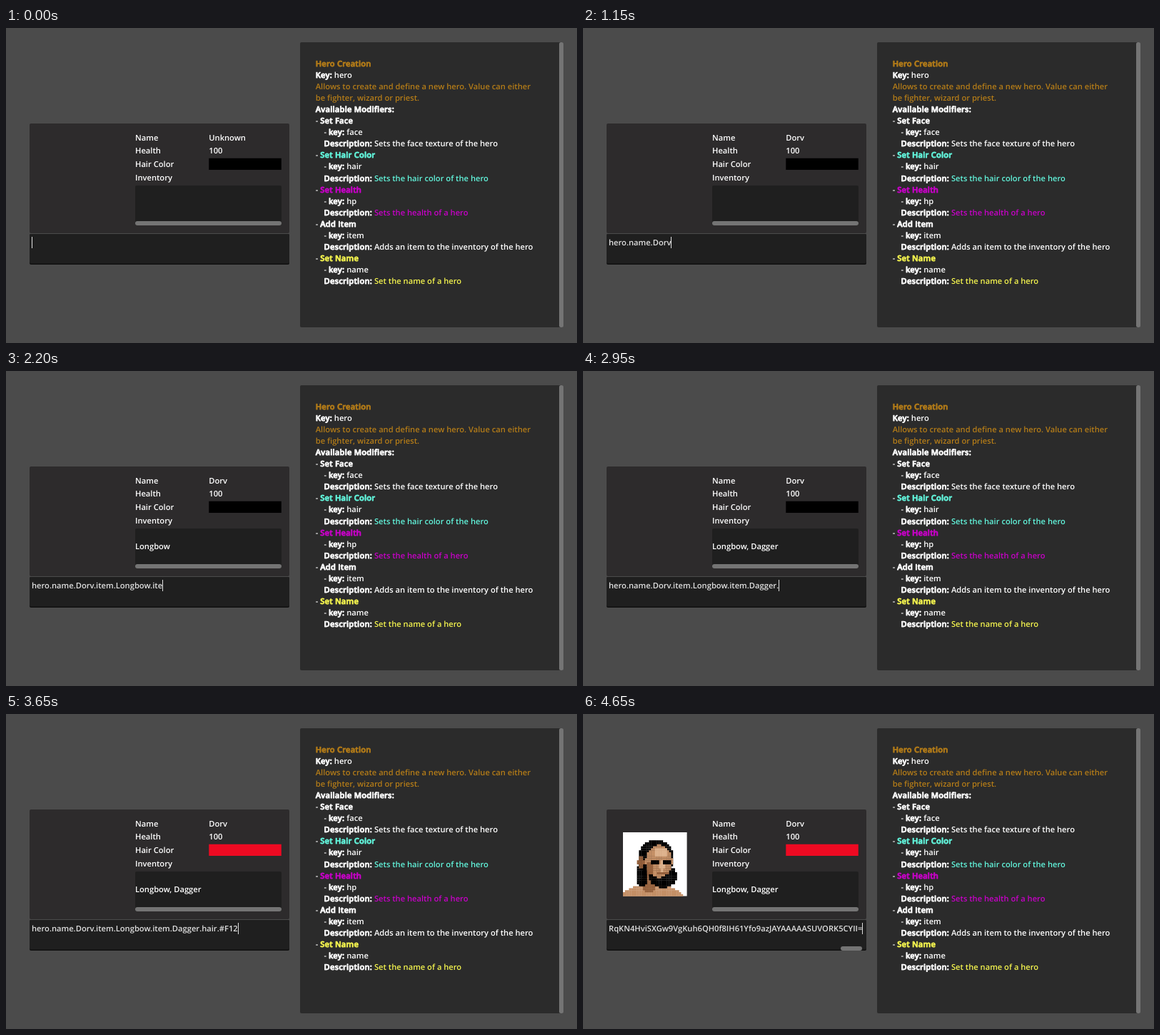
Animation of 800 by 442 pixels, one loop 5150 ms. Source, as an HTML page with a canvas:

```html
<!DOCTYPE html>
<html lang="en">
<head>
<meta charset="utf-8">
<title>Hero Creation</title>
<style>
html, body { margin: 0; width: 100%; height: 100%; overflow: hidden; background: #4b4b4b; }
canvas { display: block; }
</style>
</head>
<body>
<canvas id="stage" width="800" height="442"></canvas>
<script>
const ctx = document.getElementById('stage').getContext('2d');
const LOOP = 5150;
const FONT = '600 11.165px "Open Sans", sans-serif';
const WHITE = '#fff', GOLD = '#b47c18', CYAN = '#62f5dc', PINK = '#c800c8', YELLOW = '#f4f44e';
const GREY = '#747474', INPUT = '#e0e0e0';

const PASTED = 'RqKN4HviSXGw9VgKuh6QH0f8IH61Yfo9azJAYAAAAASUVORK5CYII=';
const PASTE_TIME = 4600;

// Bursts of typing: text, time of first key, time of last key
const BURSTS = [
  ['hero.name', 250, 800], ['.Dorv', 900, 1150], ['.', 1350],
  ['item.', 1500, 1700], ['Longbow', 1750, 2000],
  ['.item.Dagger', 2050, 2550], ['.', 2950],
  ['hair', 3050, 3200], ['.', 3400], ['#F12', 3500, 3650], ['.', 4100],
  ['face', 4250, 4400], ['.', 4550]
];

const MODIFIERS = [
  ['Set Face', 'face', 'Sets the face texture of the hero', WHITE],
  ['Set Hair Color', 'hair', 'Sets the hair color of the hero', CYAN],
  ['Set Health', 'hp', 'Sets the health of a hero', PINK],
  ['Add Item', 'item', 'Adds an item to the inventory of the hero', WHITE],
  ['Set Name', 'name', 'Set the name of a hero', YELLOW]
];

function typedAt(time) {
  return BURSTS.map(([str, first, last = first + 1]) => {
    if (time < first) return '';
    const progress = Math.min(1, (time - first) / (last - first));
    return str.slice(0, 1 + Math.floor(progress * (str.length - 1) + 1e-6));
  }).join('');
}

function box(x, y, w, h, color, radius = 0) {
  ctx.fillStyle = color;
  ctx.beginPath();
  ctx.roundRect(x, y, w, h, radius);
  ctx.fill();
}

// Bold is the same face, emboldened by an outline
function text(str, x, y, color = WHITE, bold = false) {
  ctx.fillStyle = ctx.strokeStyle = color;
  ctx.letterSpacing = bold ? '0.22px' : '0px';
  ctx.fillText(str, x, y);
  if (bold) ctx.strokeText(str, x, y);
  return x + ctx.measureText(str).width;
}

function drawHelp() {
  box(412, 20, 368, 400, '#2b2b2b', 2);
  box(775, 20, 6, 400, GREY, 2.5);

  let row = 0;
  const line = (x, ...runs) => {
    const y = 54 + 16.05 * row++;
    for (const [str, color, bold] of runs) x = text(str, x, y, color, bold);
  };
  const left = 433.7, indent = 445.5;
  line(left, ['Hero Creation', GOLD, true]);
  line(left, ['Key:', WHITE, true], [' hero']);
  line(left, ['Allows to create and define a new hero. Value can either', GOLD]);
  line(left, ['be fighter, wizard or priest.', GOLD]);
  line(left, ['Available Modifiers:', WHITE, true]);
  for (const [title, key, description, color] of MODIFIERS) {
    line(left, ['- '], [title, color, true]);
    line(indent, ['- '], ['key:', WHITE, true], [' ' + key]);
    line(indent, ['Description:', WHITE, true], [' ' + description, color]);
  }
}

// Portrait of ellipses snapped to a 32 x 32 pixel grid
function drawPortrait(left, top) {
  const cells = 32, cell = 2.8;
  const blob = (color, cx, cy, rx, ry) => {
    ctx.fillStyle = color;
    for (let row = 0; row < cells; row++) {
      for (let col = 0; col < cells; col++) {
        if (Math.hypot((col + 0.5 - cx) / rx, (row + 0.5 - cy) / ry) < 1) {
          ctx.fillRect(left + col * cell, top + row * cell, cell + 0.2, cell + 0.2);
        }
      }
    }
  };
  const hair = '#000', skin = '#c48f66', light = '#deb38e', shade = '#94603c';

  box(left, top, cells * cell, cells * cell, '#fff');
  blob(skin, 14.5, 33, 15.5, 7);
  blob(shade, 13, 25, 4, 5);
  blob(hair, 9.5, 21.5, 3, 5.5);
  blob(hair, 16.5, 13, 9, 9.3);
  blob(hair, 20, 22, 7, 5.7);
  blob(shade, 9, 15, 1.6, 3);
  blob(skin, 18, 14.5, 6.6, 8.2);
  blob(light, 19, 10, 3.5, 2.2);
  blob(shade, 13.5, 18, 1.6, 3.5);
  blob(light, 19.5, 17, 1.2, 2.6);
  for (const eye of [16, 22]) blob(hair, eye, 15, 1.8, 1);
  blob(shade, 20, 20.5, 2.6, 0.7);
}

function parse(command) {
  const hero = { name: 'Unknown', items: [], hair: '#000', error: '' };
  const parts = command.split('.').slice(1);
  for (let i = 0; i + 1 < parts.length; i += 2) {
    const [key, value] = [parts[i], parts[i + 1]];
    if (!value) continue;
    if (key === 'name') hero.name = value;
    if (key === 'item') hero.items.push(value);
    if (key === 'hair') {
      if (value.length === 4) hero.hair = '#ee0a22';
      else hero.error = value;
    }
  }
  return hero;
}

function drawError(value) {
  const lines = [
    value + ' was given, but needs to be a hexadecimal value (case-',
    'insensitive) of either 3, 4, 6 or 8 digits, and may be prefixed by',
    'a hash sign (#).'
  ];
  lines.forEach((str, i) => text(str, 44.2, 157.5 + i * 18.15, '#dc5c5c'));
}

function drawHero(hero) {
  const rowY = row => 157.5 + row * 18.84;
  ['Name', 'Health', 'Hair Color', 'Inventory'].forEach((label, row) => text(label, 181, rowY(row)));
  text(hero.name, 284.3, rowY(0));
  text('100', 284.3, rowY(1));
  box(284.3, 182.8, 101.5, 16.2, hero.hair);
  box(181, 221, 205, 56, '#1f1f1f', 2);
  box(181, 271, 205, 6, GREY, 3);
  text(hero.items.join(', '), 181, 250);
}

function drawInput(str, scrolled) {
  box(33, 289, 364, 43, '#101010', 2);
  box(33, 289, 364, 41.5, '#1f1f1f', 2);
  const end = text(str, 36, 305, INPUT);
  box(Math.round(end), 293, 1, 16, INPUT);
  if (scrolled) box(361, 326, 30, 6, GREY, 3);
}

function draw(time) {
  const command = typedAt(time);
  const pasted = time >= PASTE_TIME;
  const hero = parse(command);

  box(0, 0, 800, 442, '#4b4b4b');
  ctx.font = FONT;
  ctx.textRendering = 'geometricPrecision';
  ctx.lineWidth = 0.8;
  ctx.lineJoin = 'round';
  drawHelp();
  box(33, 134, 364, 154, '#2d2b2c', 2);
  if (hero.error) drawError(hero.error);
  else drawHero(hero);
  if (pasted) drawPortrait(56, 166);
  drawInput(pasted ? PASTED : command, pasted);
}

function tick() {
  draw(performance.now() % LOOP);
  requestAnimationFrame(tick);
}
tick();
</script>
</body>
</html>
```
